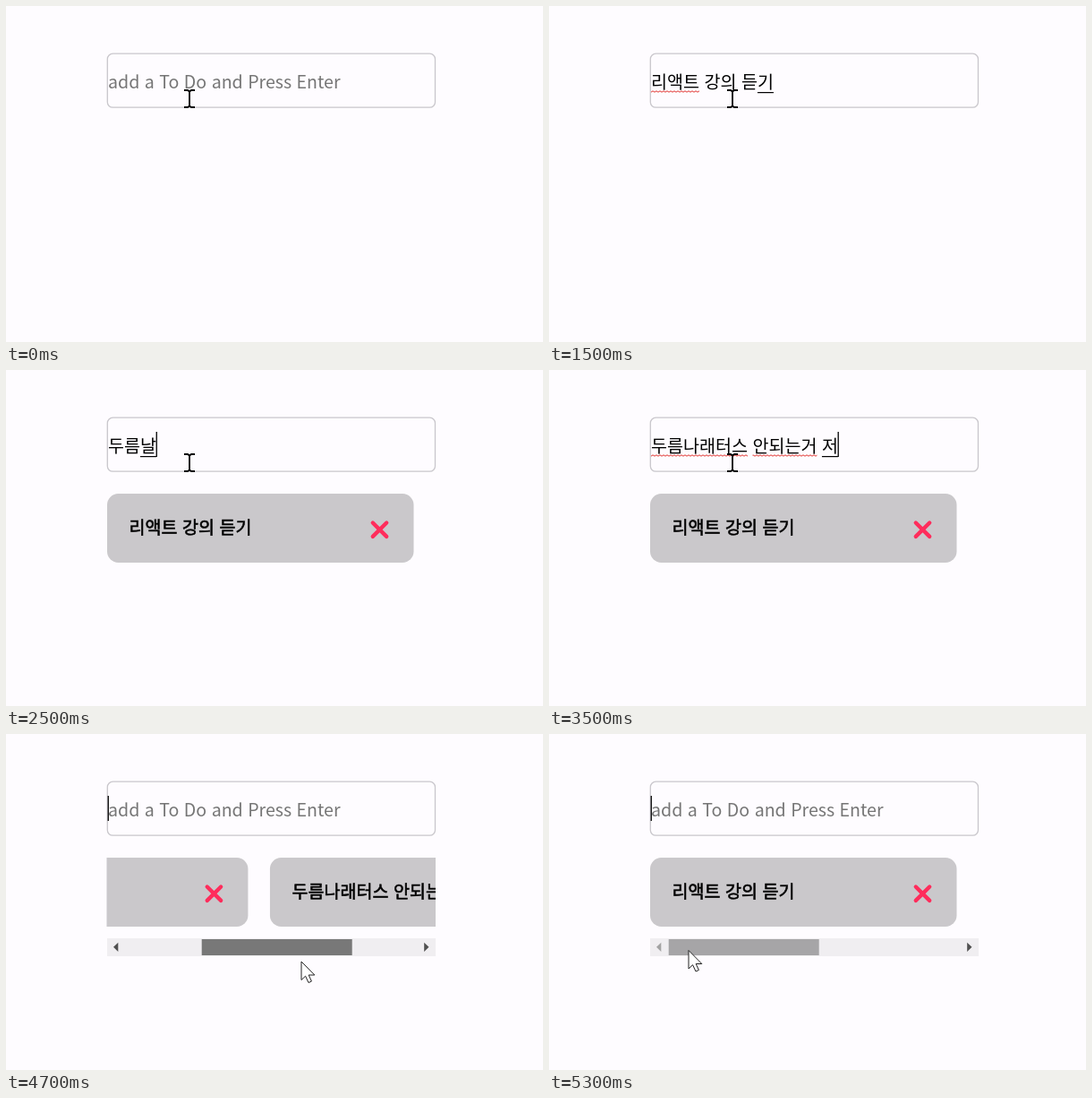
An HTML page for the animation above (5400 ms loop, 600 by 375 pixels).

```html
<!DOCTYPE html>
<html lang="ko">
<head>
<meta charset="utf-8">
<title>To Do</title>
<style>
  html, body { margin: 0; width: 100%; height: 100%; overflow: hidden; background: #fefcff; }
  svg { display: block; width: 600px; height: 375px; }
  text { font: 19.57px "Noto Sans CJK KR", "Noto Sans CJK", sans-serif; white-space: pre; }
  .task text { stroke: #000; stroke-width: .55px; }
  .task rect { fill: #cac8cb; }
  .task path { stroke: #ff2d5c; stroke-width: 4.4; stroke-linecap: round; }
</style>
</head>
<body>
<svg viewBox="0 0 600 375">
  <defs>
    <clipPath id="listClip"><rect x="112.5" y="130" width="367.5" height="90"/></clipPath>
    <pattern id="wave" y="94" width="4" height="3" patternUnits="userSpaceOnUse">
      <path d="M-1 1.5L0 .8L2 2.2L4 .8L5 1.5" fill="none" stroke="#e0302c"/>
    </pattern>
  </defs>

  <rect x="113.3" y="53.2" width="366.2" height="60" rx="6" fill="none" stroke="#c9c7cc" stroke-width="1.3"/>
  <text id="hint" x="114" y="91.6" fill="#757575">add a To Do and Press Enter</text>
  <text id="typed" x="114" y="91.6"></text>
  <g id="squiggles" fill="url(#wave)"></g>
  <rect id="underline" y="96" height="1.2"/>
  <rect id="caret" y="69" width="1.3" height="28"/>

  <g clip-path="url(#listClip)"><g id="list"></g></g>

  <g id="scrollbar">
    <rect x="113" y="228" width="367" height="20" fill="#f0eef1"/>
    <rect id="thumb" y="229" width="168" height="18"/>
    <path id="left" d="M125.3 232.7V243L120 237.8Z"/>
    <path id="right" d="M467.2 232.7V243L472.5 237.8Z"/>
  </g>

  <path id="beam" d="M199 94H203L205 95.5L207 94H211M205 95V112M199 113H203L205 111.5L207 113H211"
        fill="none" stroke="#000" stroke-width="1.8"/>
  <path id="arrow" d="M0 0V20.5L4.6 16.2L8 23.5L11.4 22L8.2 15H14.8Z" fill="#fff" stroke="#222"/>
</svg>
<script>
const STEP = 100, LOOP = 5400;
const INPUT_X = 114, TRACK_X = 133.7, TRAVEL = 157.3, MAX_SCROLL = 342.5, GRAB_X = 245;
const $ = id => document.getElementById(id);
const show = (id, on) => $(id).setAttribute('visibility', on ? 'visible' : 'hidden');
const set = (id, attrs) => Object.entries(attrs).forEach(([k, v]) => $(id).setAttribute(k, v));
const clamp = (v, max) => Math.max(0, Math.min(max, v));
const within = (n, spans) => spans.some(([a, b]) => n >= a && n <= b);

const tasks = ['리액트 강의 듣기', '두름나래터스 안되는거 정리하기'];
const phrase = '두름나래터스 안되는거 ';

// Input contents: start step, then one value per step
const drafts = [
  [0, ''],
  [2, 'ㄹ', '리', '리애', '리액', '리액트', '리액트 '],
  [8, ...['가', '강', '강의', '강의 ㄷ', '강의 듣', '강의 듣기'].map(s => '리액트 ' + s)],
  [18, ''],
  [23, '두', '두르', '두름날', '두름나래', '두름나래터', '두름나래터스'],
  [30, ...[9, 11, 12, 13, 14].map(n => phrase.slice(0, n - 1)), phrase + '저'],
  [36, ...['정', '정리', '정리하', '정리하기'].map(s => phrase + s)],
  [41, '']
];
const caretOff = [[0, 1], [14, 15], [18, 18], [21, 22], [42, 45]];

// Pointer: step, x, y
const pointer = [
  [44, 225, 160], [45, 243, 236], [46, 245, 241], [47, 330, 254], [48, 440, 257],
  [49, 509, 244.5], [51, 400, 244], [52, 250, 243], [53, 156, 241.5]
];
const latest = (rows, n) => rows.filter(row => row[0] <= n).pop();

$('list').innerHTML = tasks.map((task, i) => `
  <g class="task" transform="translate(${113 + i * 367} 138)">
    <rect width="342.5" height="77" rx="12.5"/>
    <text x="24.5" y="44.8">${task}</text>
    <path d="M296.8 32.5l15.4 15.4m0 -15.4l-15.4 15.4"/>
  </g>`).join('');

function drawInput(n) {
  const [start, ...values] = latest(drafts, n);
  const value = values[Math.min(n - start, values.length - 1)];
  const typed = $('typed');
  typed.textContent = value;
  const xAt = count => INPUT_X + (count ? typed.getSubStringLength(0, count) : 0);
  const end = xAt(value.length);

  show('hint', !value);
  show('caret', !within(n, caretOff));
  set('caret', { x: end - .4 });

  const composing = value && !value.endsWith(' ') && n !== 17 && n !== 40;
  const from = xAt(Math.max(0, value.length - 1));
  show('underline', composing);
  set('underline', { x: from, width: end - from });

  $('squiggles').innerHTML = [...value.matchAll(/\S+(?= )/g)]
    .filter(([word]) => word !== '강의')
    .map(({ 0: word, index }) => {
      const x = xAt(index);
      return `<rect x="${x}" y="94" width="${xAt(index + word.length) - x}" height="3"/>`;
    }).join('');
}

function drawList(n) {
  const at = latest(pointer, n);
  const dragging = n >= 46 && n <= 52;
  const shift = dragging ? clamp(at[1] - GRAB_X, TRAVEL) : 0;
  show('list', n >= 18);
  set('list', { transform: `translate(${-shift / TRAVEL * MAX_SCROLL} 0)` });
  show('scrollbar', n >= 41);
  set('thumb', { x: TRACK_X + shift, fill: dragging ? '#787878' : at && n >= 45 ? '#a6a5a7' : '#c1c0c2' });
  set('left', { fill: shift > 0 ? '#505050' : '#a3a3a3' });
  set('right', { fill: shift < TRAVEL ? '#505050' : '#a3a3a3' });

  show('beam', !at);
  show('arrow', at);
  if (at) set('arrow', { transform: `translate(${at[1]} ${at[2]})` });
}

const begin = performance.now();
function tick() {
  const n = Math.floor((performance.now() - begin) % LOOP / STEP);
  drawInput(n);
  drawList(n);
  requestAnimationFrame(tick);
}
tick();
</script>
</body>
</html>
```
